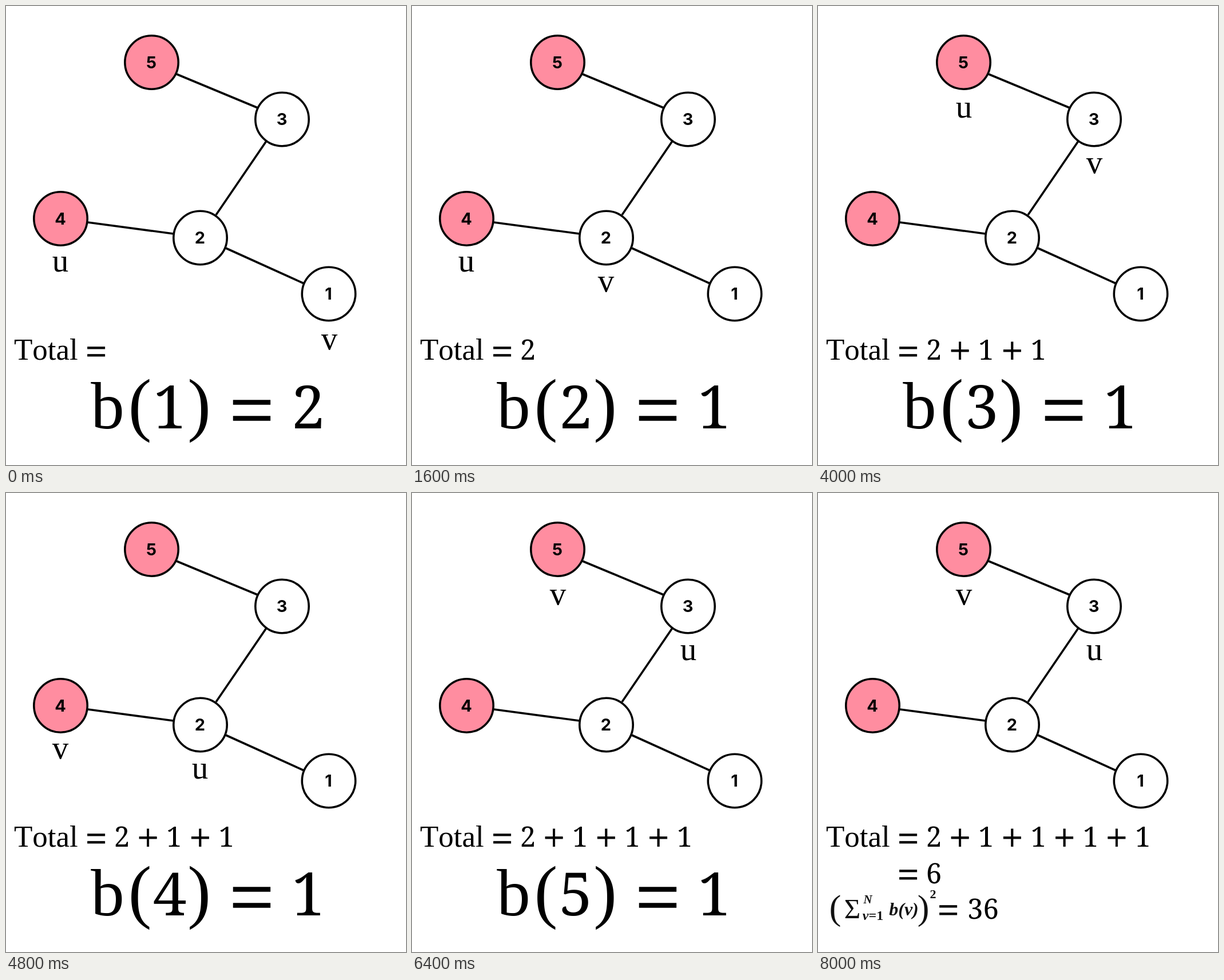
An HTML page for the animation above (9600 ms loop, 699 px wide and 802 px high).

```html
<!DOCTYPE html>
<html lang="en">
<head>
<meta charset="utf-8">
<title>Tree sum</title>
<style>
  html, body { margin: 0; width: 100%; height: 100%; overflow: hidden; background: #fff; }
  svg { display: block; width: 699px; height: 802px; }
  text { text-anchor: middle; fill: #000; }
  .edge, .node { stroke: #000; stroke-width: 3.6; }
  .id { font: 700 29px Inter, sans-serif; }
  .letter, .op { font-family: "Liberation Serif", serif; font-kerning: none; }
  .op { stroke: #000; stroke-width: .012em; }
  .digit { font-family: "Noto Serif", serif; }
  .math { font-family: "Liberation Serif", serif; font-weight: bold; fill: #111; }
  .thin { font-weight: normal; }
  .slant { font-style: italic; }
</style>
</head>
<body>
<svg viewBox="0 0 699 802"></svg>
<script>
const STEP = 800, STEPS = 12, FINAL = 10;
const svg = document.querySelector("svg");

// label: position of the letter below the node
const nodes = {
  1: { x: 564, y: 503, label: [565, 600] },
  2: { x: 339.5, y: 405, label: [339, 499] },
  3: { x: 482.5, y: 198, label: [483, 292] },
  4: { x: 95.5, y: 371.5, label: [95, 464], pink: true },
  5: { x: 254.5, y: 98.5, label: [255, 195], pink: true }
};
const edges = [
  [298, 119, 440, 178], [455, 236, 367, 365],
  [143, 378, 293, 398], [384, 423, 521, 485]
];
const partner = { 1: 4, 2: 4, 3: 5, 4: 2, 5: 3 };
const value = v => (v === 1 ? 2 : 1);

function add(parent, tag, attrs, content = "") {
  const el = document.createElementNS(svg.namespaceURI, tag);
  for (const key in attrs) el.setAttribute(key, attrs[key]);
  el.textContent = content;
  return parent.appendChild(el);
}
const group = () => add(svg, "g", {});
const write = (parent, kind, content, x, y, size) =>
  add(parent, "text", { class: kind, x, y, "font-size": size }, content);
const show = (el, on) => el.setAttribute("visibility", on ? "visible" : "hidden");
function place(el, [x, y]) {
  el.setAttribute("x", x);
  el.setAttribute("y", y);
}

for (const [x1, y1, x2, y2] of edges) add(svg, "line", { class: "edge", x1, y1, x2, y2 });
for (const id in nodes) {
  const { x, y, pink } = nodes[id];
  add(svg, "circle", { class: "node", cx: x, cy: y, r: 46.7, fill: pink ? "#ff8da0" : "#fff" });
  add(svg, "text", { class: "id", x: x - .5, y: y + 10 }, id);
}
const uLabel = write(svg, "letter", "u", 0, 0, 57);
const vLabel = write(svg, "letter", "v", 0, 0, 57);

// Running total
write(svg, "letter", "Total", 14, 618, 53).style.textAnchor = "start";
write(svg, "op", "=", 157.5, 626, 65);
const terms = [1, 2, 3, 4, 5].map((v, i) => {
  const g = group(), x = 202.5 + 91.3 * i;
  if (i) write(g, "op", "+", x - 45.8, 624, 65);
  write(g, "digit", value(v), x, 618, 49);
  return g;
});

// Large equation
const equation = group();
write(equation, "letter", "b", 177.5, 738, 117);
write(equation, "letter", "(", 234, 737, 122);
const argument = write(equation, "digit", "", 286, 738, 105);
write(equation, "letter", ")", 337.5, 737, 122);
write(equation, "op", "=", 429.5, 753, 137);
const result = write(equation, "digit", "", 528, 738, 105);

// Closing lines
const closing = group();
write(closing, "op", "=", 157.5, 689, 65);
write(closing, "digit", "6", 202.5, 682, 49);
write(closing, "math thin", "(", 30, 745, 62);
write(closing, "math thin", "Σ", 60, 743, 49);
write(closing, "math slant", "N", 87, 717, 21);
const lower = write(closing, "math", "", 96, 746, 24);
add(lower, "tspan", { class: "slant" }, "v");
add(lower, "tspan", {}, "=1");
write(closing, "math slant", "b(v)", 150, 738, 32);
write(closing, "math thin", ")", 184, 745, 62);
write(closing, "math", "2", 201, 708, 22);
write(closing, "op", "=", 227.5, 751, 65);
write(closing, "digit", "36", 288.5, 744, 49);

let shown = -1;
function draw() {
  const step = Math.floor(performance.now() / STEP) % STEPS;
  if (step !== shown) {
    shown = step;
    const v = Math.min(5, 1 + Math.floor(step / 2));
    place(uLabel, nodes[partner[v]].label);
    place(vLabel, nodes[v].label);
    terms.forEach((term, i) => show(term, i < Math.floor((step + 1) / 2)));
    argument.textContent = v;
    result.textContent = value(v);
    show(equation, step < FINAL);
    show(closing, step >= FINAL);
  }
  requestAnimationFrame(draw);
}
draw();
</script>
</body>
</html>
```
